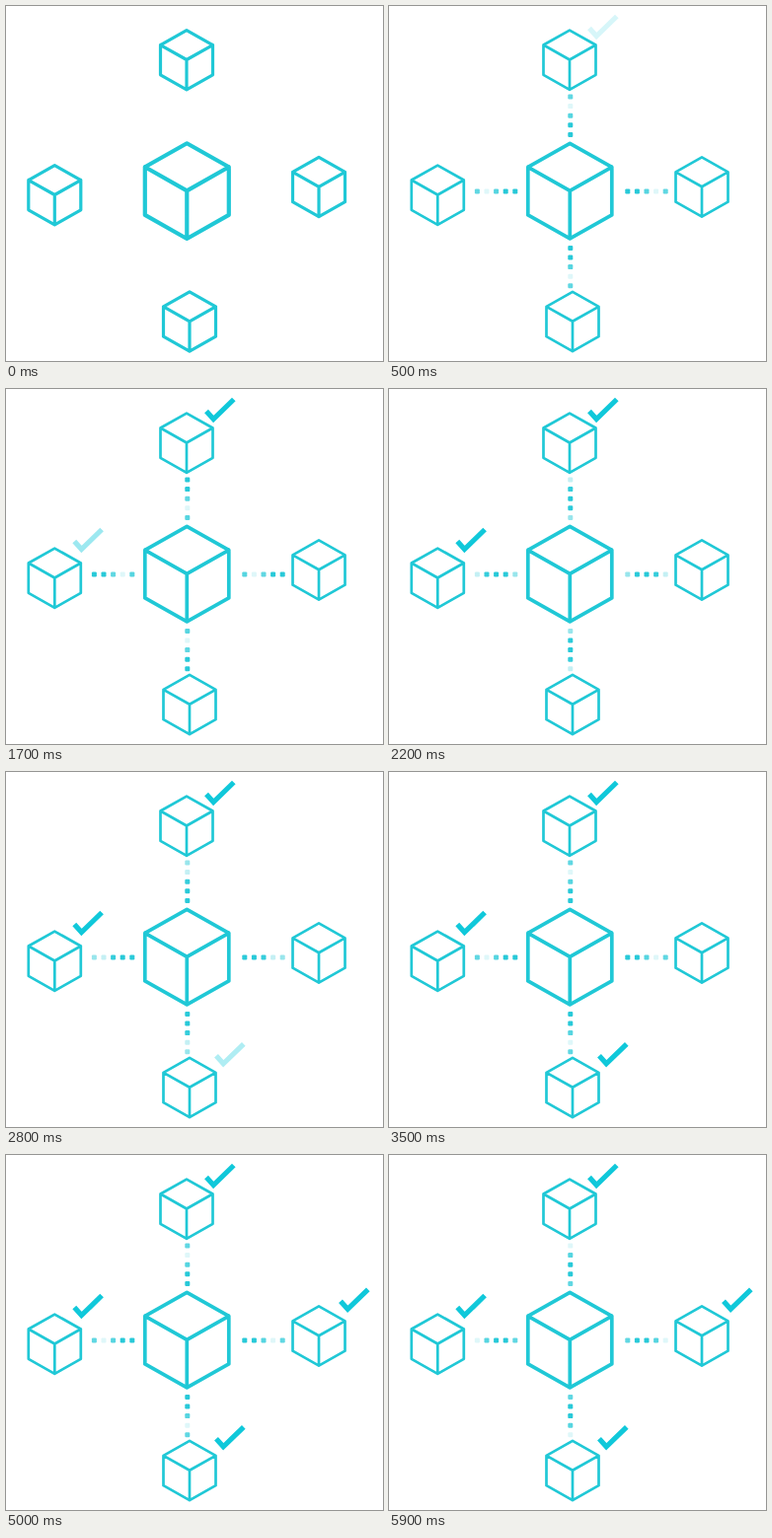
Animation, 382 px wide and 360 px high, one loop 6000 ms. Source, as an HTML page:

```html
<!DOCTYPE html>
<html lang="en">
<head>
<meta charset="utf-8">
<title>Connected cubes</title>
<style>
html, body { margin: 0; width: 100%; height: 100%; overflow: hidden; background: #fff; }
svg { display: block; width: 382px; height: 360px; }
.cube { fill: none; stroke: #20c8d6; stroke-linejoin: round; stroke-linecap: round; }
.check { fill: none; stroke: #10c8da; stroke-width: 5.2; }
.dot { fill: #28c9d8; }
</style>
</head>
<body>
<svg id="stage" viewBox="0 0 382 360"></svg>
<script>
const LOOP = 6000, STEP = 100, PULSE = 750;
const DOTS = 5, GAP = 9.6, SIZE = 5;
const FIRST_CHECK = 450, CHECK_GAP = 1125, FADE = 300;
const hub = { x: 183.3, y: 187.3, w: 42.5 };

// Outer cubes in the order they are confirmed:
// centre, direction from the hub, offset of the check mark
const nodes = [
  { x: 183, y: 54.5, dx: 0, dy: -1, cx: 20, cy: -32 },
  { x: 49.3, y: 191.5, dx: -1, dy: 0, cx: 20, cy: -37 },
  { x: 186, y: 319.8, dx: 0, dy: 1, cx: 27, cy: -32 },
  { x: 317, y: 183.3, dx: 1, dy: 0, cx: 22, cy: -35 }
];

const stage = document.getElementById('stage');
const clamp = v => Math.max(0, Math.min(1, v));

function add(tag, attrs) {
  const el = document.createElementNS('http://www.w3.org/2000/svg', tag);
  for (const k in attrs) el.setAttribute(k, attrs[k]);
  return stage.appendChild(el);
}

function cube(x, y, w, line) {
  const rise = w * 0.565, h = w * 1.145;
  const d = `M${x} ${y - 2 * rise}l${w} ${rise}v${h}l${-w} ${rise}l${-w} ${-rise}v${-h}z` +
    `M${x - w} ${y - rise}l${w} ${rise}l${w} ${-rise}M${x} ${y}v${h}`;
  return { el: add('path', { class: 'cube', d }), line };
}

// Dots run outward from the hub, slightly further out when vertical
function dot({ dx, dy }, i) {
  const x = hub.x + 0.5 + dx * (57 + i * GAP) + Math.abs(dx);
  const y = hub.y + 0.6 + dy * (57.5 + i * GAP);
  const el = add('rect', {
    class: 'dot', x: x - SIZE / 2, y: y - SIZE / 2, width: SIZE, height: SIZE, rx: 1.2
  });
  return { el, i };
}

const cubes = [cube(hub.x, hub.y, hub.w, 3.7), ...nodes.map(n => cube(n.x, n.y, 26.5, 2.7))];
const dots = nodes.flatMap(n => Array.from({ length: DOTS }, (_, i) => dot(n, i)));
const checks = nodes.map(n =>
  add('path', { class: 'check', d: `M${n.x + n.cx} ${n.y + n.cy}l7.2 8l20.6 -20` }));

// A pale wave travels outward along the dots, one pass per pulse
function dotAlpha(i, t) {
  const p = t / PULSE - (i + 0.3) / DOTS;
  const wave = (1 + Math.cos(2 * Math.PI * p)) / 2;
  return 1 - 0.85 * wave ** 3;
}

function draw(time) {
  const t = Math.floor(time % LOOP / STEP) * STEP;
  const bold = t < STEP ? 0.5 : 0;
  const shown = clamp(t / 400);
  for (const c of cubes) c.el.setAttribute('stroke-width', c.line + bold);
  for (const d of dots) d.el.setAttribute('opacity', shown * dotAlpha(d.i, t));
  checks.forEach((el, k) =>
    el.setAttribute('opacity', clamp((t - FIRST_CHECK - k * CHECK_GAP) / FADE)));
}

const origin = performance.now();
function tick() {
  draw(performance.now() - origin);
  requestAnimationFrame(tick);
}
tick();
</script>
</body>
</html>
```
